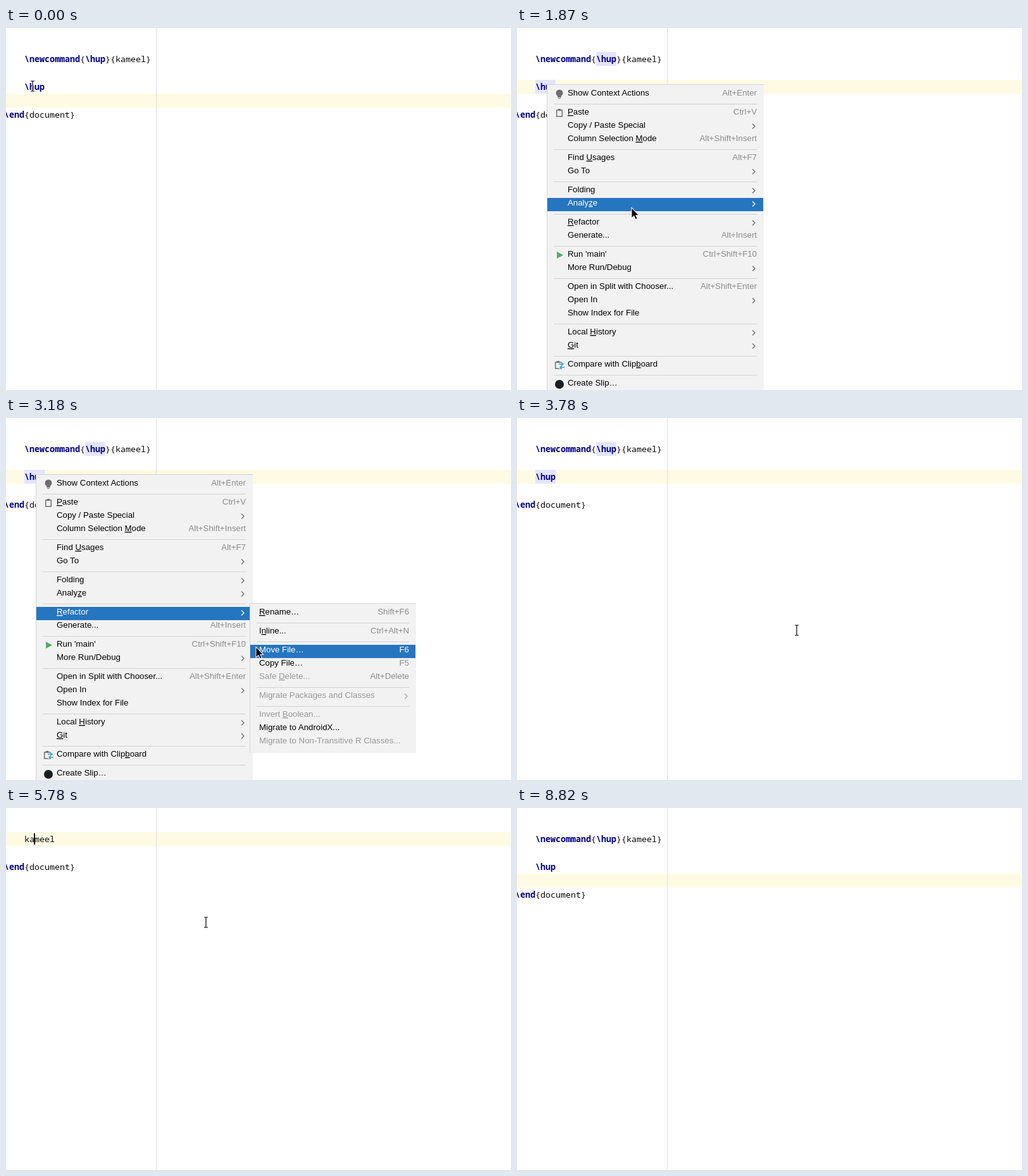
These frames come from a looping animation (798 px wide and 573 px high, 9890 ms). An HTML page:

```html
<!DOCTYPE html>
<html lang="en">
<head>
<meta charset="utf-8">
<title>Inline command</title>
<style>
  html, body { margin: 0; width: 100%; height: 100%; overflow: hidden; background: #fff; }
  svg { display: block; }
  text { font: 13.25px "Liberation Sans", Arial, sans-serif; fill: #000; white-space: pre; }
  .code text { font: 13.333px "Noto Sans Mono", monospace; fill: #080808; }
  .code .cmd { font-weight: bold; fill: #000080; }
  .line { fill: #fffae3; }
  .ident { fill: #e4e4ff; }
  .panel { fill: #f2f2f2; }
  .edge { fill: none; stroke: #d3d3d3; }
  .sep { stroke: #d2d2d2; }
  .row rect { fill: none; }
  .row .key { fill: #8c8c8c; text-anchor: end; }
  .row path { fill: none; stroke: #6e6e6e; stroke-width: 1.3; }
  .row.off text { fill: #999; }
  .row.off .key { fill: #8c8c8c; }
  .row.off path { stroke: #aaa; }
  .row.on rect { fill: #2675bf; }
  .row.on text { fill: #fff; }
  .row.on path { stroke: #fff; }
  .u { text-decoration: underline; }
  .mid text { text-anchor: middle; }
  .btn { fill: #fff; stroke: #c4c4c4; }
  .radio { fill: #fff; stroke: #aeaeae; }
  #dialog text { font-size: 13.07px; }
  #dialog .small { font-size: 12.67px; fill: #fff; }
  #dialog .strong { font-weight: bold; }
  #dialog .frame { filter: drop-shadow(0 1px 3px rgba(0, 0, 0, .5)) drop-shadow(0 3px 6px rgba(0, 0, 0, .7)); }
</style>
</head>
<body>
<svg width="798" height="573" viewBox="0 0 798 573">
  <defs>
    <linearGradient id="bar" x2="0" y2="1">
      <stop stop-color="#8cc0f5"/>
      <stop offset=".12" stop-color="#5b9fe8"/>
      <stop offset=".5" stop-color="#478fe0"/>
      <stop offset=".55" stop-color="#3079d1"/>
      <stop offset="1" stop-color="#4088dc"/>
    </linearGradient>
    <g id="bulb">
      <path d="M-2.5 6C-2.5 4-5.5 3.500-5.5 0A5.500 5.500 0 0 1 5.500 0C5.500 3.500 2.500 4 2.500 6Z"/>
      <path d="M-3 6.500H3M-2 8.500H2" stroke="#6e6e6e" fill="none"/>
    </g>
    <g id="board" fill="none" stroke="#6e6e6e" stroke-width="1.500">
      <path d="M-4.300-4H4.300V6H-4.300Z"/>
      <path d="M-2-4.500H2" stroke-width="3"/>
    </g>
  </defs>

  <g class="code">
    <rect id="row" class="line" width="798" height="22"/>
    <g id="idents">
      <rect class="ident" x="125" y="38" width="32" height="22"/>
      <rect class="ident" x="29" y="82" width="32" height="22"/>
    </g>
    <path d="M237.500 0V573" stroke="#e0e0e0"/>
    <g id="before">
      <text x="29" y="54"><tspan class="cmd">\newcommand</tspan>{<tspan class="cmd">\hup</tspan>}{kameel}</text>
      <text class="cmd" x="29" y="98">\hup</text>
    </g>
    <g id="after">
      <text x="29" y="54">kameel</text>
      <path id="wave" fill="none" stroke="#b4b4b4"/>
      <rect id="caret" x="44" y="40" width="2" height="18"/>
    </g>
    <text id="end" x="-3"><tspan class="cmd">\end</tspan>{document}</text>
    <use id="hint" href="#bulb" x="11" fill="#eda44f"/>
  </g>

  <g id="menu">
    <rect class="panel" x="47" y="89" width="343" height="500"/>
    <path class="edge" d="M47.500 573V89.500H390"/>
    <g id="mainRows"></g>
    <use href="#bulb" x="67" y="103" fill="#6e6e6e"/>
    <use href="#board" x="67" y="134"/>
    <path d="M63 354L73 359.500L63 365Z" fill="#59a869"/>
    <use href="#board" x="65" y="533"/>
    <path d="M66 530H75V539H66Z" fill="#f2f2f2"/>
    <path d="M66 532H73M70 529.500L73 532L70 534.500M75 537H68M71 534.500L68 537L71 539.500" fill="none" stroke="#389fd6" stroke-width="1.500"/>
    <circle cx="67" cy="564" r="7" fill="#1b1f23"/>
  </g>
  <g id="sub">
    <rect class="panel" x="385" y="293" width="263" height="237"/>
    <path class="edge" d="M385.500 530V293.500H648"/>
    <g id="subRows"></g>
  </g>

  <g id="dialog">
    <rect class="frame" x="240" y="36" width="291" height="179" rx="3" fill="#1d4c8f"/>
    <path d="M241 214V39Q241 37 243 37H528Q530 37 530 39V214Z" fill="#4088dc"/>
    <path d="M241 65V39Q241 37 243 37H528Q530 37 530 39V65Z" fill="url(#bar)"/>
    <path d="M242 65H529V213H242Z" fill="#f2f2f2"/>
    <path d="M241 65.500H530" stroke="#2a66b3"/>
    <rect x="247" y="41" width="20" height="20"/>
    <path d="M512.500 47.500L519.500 54.500M519.500 47.500L512.500 54.500" stroke="#fff" stroke-width="2"/>
    <text x="258" y="83">Command \newcommand has 1 ocurrences</text>
    <circle cx="267.500" cy="110.500" r="9" fill="#97c3f3"/>
    <circle cx="267.500" cy="110.500" r="7" fill="#3d8fd9"/>
    <circle cx="267.500" cy="110.500" r="2.700" fill="#fff"/>
    <circle class="radio" cx="267.500" cy="131.500" r="7"/>
    <circle class="radio" cx="267.500" cy="152.500" r="7"/>
    <text x="280" y="112">Inline all and remove the command</text>
    <text x="280" y="133">Inline all and keep the command</text>
    <text x="280" y="154">Inline this and keep the command</text>
    <rect x="261.500" y="174.500" width="77" height="23" rx="2" fill="#4f8aca" stroke="#3f74ae"/>
    <rect class="btn" x="351.500" y="174.500" width="74" height="23" rx="2"/>
    <rect class="btn" x="438.500" y="174.500" width="71" height="23" rx="2"/>
    <g class="mid">
      <text class="small" x="386" y="54">Inline Command</text>
      <text class="small strong" x="300.500" y="188">Refactor</text>
      <text x="388" y="188">Preview</text>
      <text x="474" y="188">Cancel</text>
    </g>
  </g>

  <g id="arrow">
    <path d="M.5 1.500V16L4 12.800L6.500 18.300L8.500 17.400L6.100 12H10.500Z" stroke="#fff" stroke-width="2" paint-order="stroke"/>
  </g>
  <g id="beam" fill="none">
    <path d="M-3-8H3M-3 8H3M0-8V8" stroke="#fff" stroke-width="3"/>
    <path d="M-3-8H3M-3 8H3M0-8V8" stroke="#000" stroke-width="1.200"/>
  </g>
</svg>
<script>
const LOOP = 9890;
const $ = id => document.getElementById(id);

// "_" marks the mnemonic, ">" a submenu, "!" a disabled item, "-" a separator.
const MAIN = [
  'Show Context Actions|Alt+Enter', '-',
  '_Paste|Ctrl+V', 'Copy / Paste Special|>', 'Column Selection _Mode|Alt+Shift+Insert', '-',
  'Find _Usages|Alt+F7', 'Go To|>', '-',
  'Folding|>', 'Analy_ze|>', '-',
  '_Refactor|>', 'Generate...|Alt+Insert', '-',
  "Run 'main'|Ctrl+Shift+F10", 'More Run/Debug|>', '-',
  'Open in Split with Chooser...|Alt+Shift+Enter', 'Open In|>', 'Show Index for File|', '-',
  'Local _History|>', '_Git|>', '-',
  'Compare with Clip_board|', '-',
  'Create Slip…|'
];
const SUB = [
  '_Rename…|Shift+F6', '-',
  'I_nline...|Ctrl+Alt+N', '-',
  'Move File…|F6', 'Copy File…|F5', '!Safe _Delete...|Alt+Delete', '-',
  '!Migrate Packages and Classes|>', '-',
  '!Invert _Boolean...|', 'Migrate to AndroidX...|', '!Migrate to Non-Transitive R Classes...|'
];

function fillMenu(box, items, left, textX, right, base) {
  const rows = [];
  let html = '';
  for (const item of items) {
    if (item === '-') {
      const y = base - 7.5;
      html += `<path class="sep" d="M${left + 10} ${y}H${right}"/>`;
      base += 9;
      continue;
    }
    const [raw, key] = item.split('|');
    const off = raw[0] === '!';
    const label = raw.replace('!', '').replace(/_(.)/, '<tspan class="u">$1</tspan>');
    const tail = key === '>'
      ? `<path d="M${right - 7} ${base - 6.5}l4 4l-4 4"/>`
      : `<text class="key" x="${right}" y="${base}">${key}</text>`;
    html += `<g class="row${off ? ' off' : ''}"><rect x="${left}" y="${base - 12}" width="${right + 10 - left}" height="21"/>` +
      `<text x="${textX}" y="${base}">${label}</text>${tail}</g>`;
    rows.push({ top: base - 12, off });
    base += 21;
  }
  box.innerHTML = html;
  box.querySelectorAll('.row').forEach((el, i) => rows[i].el = el);
  return rows;
}

const mainRows = fillMenu($('mainRows'), MAIN, 48, 80, 379, 107);
const subRows = fillMenu($('subRows'), SUB, 386, 400, 637, 311);
const refactor = mainRows[8];

let wave = 'M29 58';
for (let i = 0; i < 12; i++) wave += 'l2 -2l2 2';
$('wave').setAttribute('d', wave);

// Pointer stops: time, x, y
const STOPS = [
  [0, 42, 92], [30, 42, 92], [150, 221, 54], [280, 120, 135], [400, 12, 110], [530, 47, 90],
  [700, 47, 90], [1000, 75, 140], [1300, 130, 235], [1600, 170, 300], [1750, 178, 303],
  [1870, 181, 284], [2000, 192, 302], [2150, 205, 308], [2410, 216, 291], [2670, 250, 300],
  [3000, 340, 312], [3280, 425, 390], [3610, 442, 336], [4050, 442, 336],
  [4750, 316, 181], [7790, 316, 181], [7910, 230, 319], [8060, 33, 105], [LOOP, 33, 105]
];

function pointer(t) {
  const i = STOPS.findIndex(s => s[0] > t);
  const [t0, x0, y0] = STOPS[i - 1], [t1, x1, y1] = STOPS[i];
  const p = (t - t0) / (t1 - t0);
  return [x0 + (x1 - x0) * p, y0 + (y1 - y0) * p];
}

const during = (t, a, b) => t >= a && t < b;
const ramp = (t, a, len) => Math.min(1, Math.max(0, (t - a) / len));

function show(id, opacity) {
  const el = $(id);
  el.style.display = +opacity > 0 ? '' : 'none';
  el.style.opacity = +opacity;
}

function hover(rows, y, active, pinned) {
  for (const r of rows) {
    const hit = pinned ? r === pinned : y >= r.top && y < r.top + 21;
    r.el.classList.toggle('on', active && hit && !r.off);
  }
}

function draw(t) {
  const [x, y] = pointer(t);
  const inlined = during(t, 5580, 7490);
  const marked = during(t, 700, 5580);
  const menu = during(t, 730, 3780);
  const dialogOpen = during(t, 3900, 5580);

  $('row').setAttribute('y', inlined ? 38 : marked ? 82 : 104);
  $('end').setAttribute('y', inlined ? 98 : 142);
  show('idents', marked);
  show('before', !inlined);
  show('after', inlined);
  show('wave', t >= 6350);
  show('caret', t < 7290);
  $('hint').setAttribute('y', inlined ? 22 : 88);
  show('hint', during(t, 7120, 7490) || during(t, 8390, 8820));

  show('menu', menu && ramp(t, 700, 130));
  show('sub', menu && ramp(t, 2120, 90));
  hover(mainRows, y, menu, t > 2000 && refactor);
  hover(subRows, y, menu && x > 386);
  show('dialog', ramp(t, 3900, 180) * (1 - ramp(t, 5580, 200)));

  const overDialog = dialogOpen && x > 240 && x < 531 && y > 36 && y < 215;
  const arrow = menu || overDialog;
  show('arrow', arrow);
  show('beam', !arrow && t < 8060);
  $(arrow ? 'arrow' : 'beam').setAttribute('transform', `translate(${Math.round(x)} ${Math.round(y)})`);
}

const start = performance.now();
function tick() {
  draw((performance.now() - start) % LOOP);
  requestAnimationFrame(tick);
}
tick();
</script>
</body>
</html>
```
